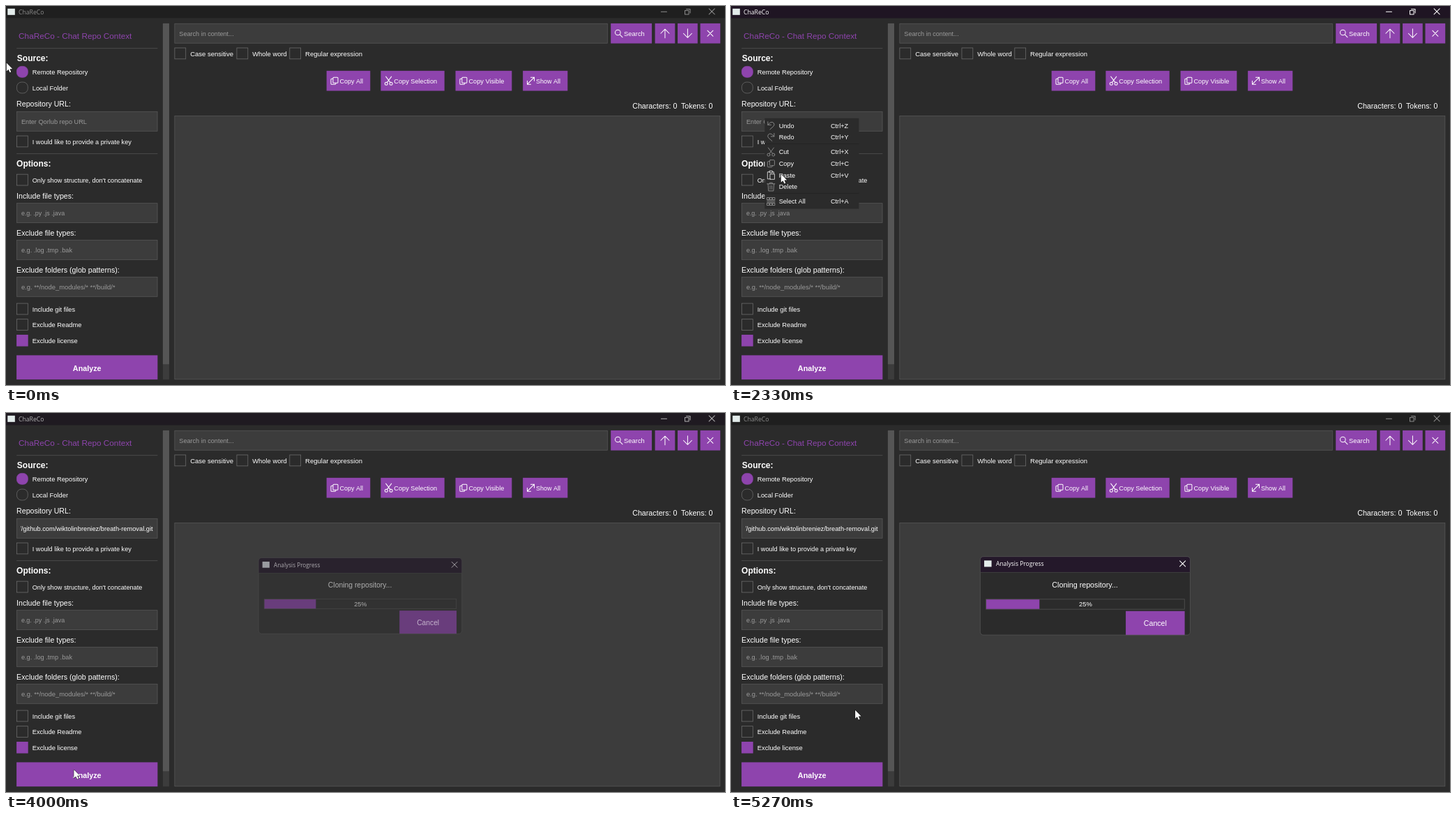
Animation of 1031 by 543 pixels, one loop 8 s. Source, as an HTML page with a canvas:

```html
<!DOCTYPE html>
<html lang="en">
<head>
<meta charset="utf-8">
<title>ChaReCo</title>
<style>
html, body { margin: 0; width: 100%; height: 100%; overflow: hidden; background: #2b2b2b; }
canvas { display: block; }
</style>
</head>
<body>
<canvas id="stage" width="1031" height="543"></canvas>
<script>
const ctx = document.getElementById('stage').getContext('2d');
// All coordinates belong to a 1366 pixel wide desktop, shown reduced
const SCALE = 1031 / 1366;
const LOOP = 8000, STEP = 200 / 3;
const PURPLE = '#8e44ad', BG = '#2b2b2b', FIELD = '#3c3c3c', LINE = '#555', HINT = '#9a9a9a';
const SANS = '"Liberation Sans", Arial, sans-serif', UI = '"Open Sans", "Noto Sans", sans-serif';
const FIELD_TOPS = [200, 374, 444, 514], FIELD_HEIGHT = 38;

const clamp = v => Math.max(0, Math.min(1, v));
const ramp = (t, from, to) => clamp((t - from) / (to - from));
const linear = k => k;
const easeOut = k => 1 - (1 - k) ** 2;
const easeInOut = k => k * k * (3 - 2 * k);

// Pointer stops: time, x, y, easing of the way there
const STOPS = [
  [0, 1, 108, linear],
  [400, 50, 227, easeInOut],
  [533, 58, 216, easeOut],
  [733, 58, 216, linear],
  [1000, 64, 212, easeOut],
  [1200, 64, 212, linear],
  [1333, 64, 213, linear],
  [1533, 64, 213, linear],
  [2333, 95, 319, easeInOut],
  [3000, 95, 319, linear],
  [3333, 122, 525, linear],
  [3867, 129, 677, easeOut],
  [4467, 129, 677, linear],
  [5267, 236, 564, easeInOut],
  [LOOP, 236, 564, linear]
];

function pointerAt(t) {
  const i = STOPS.findIndex((s, n) => n && t <= s[0]);
  const [t0, x0, y0] = STOPS[i - 1], [t1, x1, y1, ease] = STOPS[i];
  const k = ease(ramp(t, t0, t1));
  return [x0 + (x1 - x0) * k, y0 + (y1 - y0) * k];
}

function fill(x, y, w, h, color) {
  ctx.fillStyle = color;
  ctx.fillRect(x, y, w, h);
}

function frame(x, y, w, h, color = LINE) {
  ctx.strokeStyle = color;
  ctx.lineWidth = 1;
  ctx.strokeRect(x + .5, y + .5, w - 1, h - 1);
}

// y is the middle of the capitals
function text(str, x, y, size = 12.3, color = '#fff', align = 'left', weight = '', family = SANS) {
  ctx.font = `${weight} ${size}px ${family}`;
  ctx.fillStyle = color;
  ctx.textAlign = align;
  ctx.fillText(str, x, y + size * .36);
}

function icon(path, x, y, color = '#fff', width = 1) {
  ctx.save();
  ctx.translate(x, y);
  ctx.scale(4 / 3, 4 / 3);
  ctx.strokeStyle = color;
  ctx.lineWidth = width;
  ctx.lineJoin = ctx.lineCap = 'round';
  ctx.stroke(new Path2D(path));
  ctx.restore();
}

// Icons are centred on 0,0
const ICONS = {
  search: 'M2.6 -1.2a3.8 3.8 0 1 1 -7.6 0a3.8 3.8 0 1 1 7.6 0M1.6 1.6L5.5 5.5',
  up: 'M0 6.5V-6M-6 0L0 -6L6 0',
  down: 'M0 -6.5V6M-6 0L0 6L6 0',
  cross: 'M-4 -4L4 4M-4 4L4 -4',
  copy: 'M-1 -5H4Q5 -5 5 -4V2Q5 3 4 3H-1Q-2 3 -2 2V-4Q-2 -5 -1 -5M-2 -3H-4Q-5 -3 -5 -2V4Q-5 5 -4 5H1Q2 5 2 3',
  cut: 'M-4 -6L2.2 2.2M4 -6L-2.2 2.2M-1.4 4a2 2 0 1 1 -4 0a2 2 0 1 1 4 0M5.4 4a2 2 0 1 1 -4 0a2 2 0 1 1 4 0',
  expand: 'M-5 5L5 -5M0 -5H5V0M-5 0V5H0',
  undo: 'M-4.5 -5.5V-1H0M-4.5 -1L-1 -4.3Q2 -6 4 -3.5Q5.5 -1 3.5 1L-1.5 5.5',
  redo: 'M4.5 -5.5V-1H0M4.5 -1L1 -4.3Q-2 -6 -4 -3.5Q-5.5 -1 -3.5 1L1.5 5.5',
  paste: 'M-2 -4.5H-5V5.5H-1M2 -4.5H4V-2M-2 -6H2V-3.5H-2ZM-1 -1.5H5V6H-1Z',
  bin: 'M-5.5 -4H5.5M-2 -4V-5.5H2V-4M-4.3 -4L-3.5 6H3.5L4.3 -4M-1.3 -1.5V3.5M1.3 -1.5V3.5',
  all: 'M-5.5 -5.5h3v3h-3zM-1.5 -5.5h3v3h-3zM2.5 -5.5h3v3h-3zM-5.5 -1h11M-5.5 1h11M-5.5 2.5h3v3h-3zM-1.5 2.5h3v3h-3zM2.5 2.5h3v3h-3z',
  minimise: 'M-4 0H4',
  restore: 'M-3.5 -1.5H2V4H-3.5ZM-1.5 -3.5H4V2',
  beam: 'M0 -5.5V5.5M-2.5 -6H-1L0 -5.5L1 -6H2.5M-2.5 6H-1L0 5.5L1 6H2.5'
};

function checkBox(x, y, label, size, on) {
  if (on) fill(x, y - 11, 22, 22, PURPLE);
  else frame(x, y - 11, 22, 22, '#6e6e6e');
  text(label, x + 30, y + .5, size);
}

function radio(y, label, on) {
  ctx.beginPath();
  ctx.roundRect(20.5, y - 10.5, 21, 21, 9);
  ctx.fillStyle = on ? PURPLE : BG;
  ctx.strokeStyle = on ? PURPLE : '#6e6e6e';
  ctx.lineWidth = 1;
  ctx.fill();
  ctx.stroke();
  text(label, 50, y + .5, 12.35);
}

function field(x, y, w, h, hint, size) {
  fill(x, y, w, h, FIELD);
  frame(x, y, w, h);
  if (hint) text(hint, x + 9, y + 19.5, size, HINT);
}

function button(x, y, w, name, label, size) {
  fill(x, y, w, 38, PURPLE);
  if (!label) return icon(ICONS[name], x + w / 2, y + 19);
  icon(ICONS[name], x + 15, y + 19);
  text(label, x + 25, y + 19.5, size);
}

function titleBar(active) {
  const paint = (color, alpha) => {
    ctx.globalAlpha = alpha;
    text('ChaReCo', 24, 11.5, 11.4, color, 'left', '', UI);
    icon(ICONS.minimise, 1250, 11, color);
    icon(ICONS.restore, 1294.5, 10.5, color);
    icon(ICONS.cross, 1341, 10.5, color);
  };
  fill(0, 0, 1366, 23, '#1f1f1f');
  ctx.globalAlpha = active;
  fill(0, 0, 1366, 23, '#1f1523');
  paint('#8c8c8c', 1 - active);
  paint('#fff', active);
  ctx.globalAlpha = 1;
  fill(3, 5, 14, 12, '#e3eceb');
}

function sidebar(pasted) {
  const [url, include, exclude, folders] = FIELD_TOPS;
  const input = (top, hint, size) => field(20, top, 268, FIELD_HEIGHT, hint, size);

  text('ChaReCo - Chat Repo Context', 24, 56.3, 15.6, PURPLE);
  fill(20, 80, 268, 1, LINE);
  text('Source:', 21, 99.5, 15.9, '#fff', 'left', 'bold');
  radio(125, 'Remote Repository', true);
  radio(155, 'Local Folder', false);
  text('Repository URL:', 20, 186, 14.05);
  input(url, pasted ? '' : 'Enter Qorlub repo URL', 12.2);
  if (pasted) {
    ctx.save();
    ctx.beginPath();
    ctx.rect(28, 201, 258, 36);
    ctx.clip();
    text('https://github.com/wiktolinbreniez/breath-removal.git', 279, 220, 12.3, '#fff', 'right');
    ctx.restore();
  }
  checkBox(20, 257, 'I would like to provide a private key', 12.1);
  fill(20, 280, 268, 1, LINE);
  text('Options:', 20, 299.5, 15.9, '#fff', 'left', 'bold');
  checkBox(20, 330, "Only show structure, don't concatenate", 12.1);
  text('Include file types:', 20, 361, 14.05);
  input(include, 'e.g. .py .js .java', 11.9);
  text('Exclude file types:', 20, 431, 14.05);
  input(exclude, 'e.g. .log .tmp .bak', 12.2);
  text('Exclude folders (glob patterns):', 20, 501, 14.15);
  input(folders, 'e.g. **/node_modules/* **/build/*', 12.45);
  checkBox(20, 575, 'Include git files', 12.3);
  checkBox(20, 605, 'Exclude Readme', 12.3);
  checkBox(20, 635, 'Exclude license', 12.4, true);
  fill(20, 663, 268, 46, PURPLE);
  text('Analyze', 154, 688, 14.3, '#fff', 'center', 'bold');
  fill(298, 33, 12, 676, FIELD);
  fill(298, 33, 12, 647, LINE);
}

function content() {
  field(320, 33, 823, FIELD_HEIGHT, 'Search in content...', 12.05);
  button(1149, 33, 78, 'search', 'Search', 12.45);
  button(1233, 33, 38, 'up');
  button(1276, 33, 38, 'down');
  button(1319, 33, 38, 'cross');
  checkBox(320, 90, 'Case sensitive', 12.6);
  checkBox(438, 90, 'Whole word', 12.45);
  checkBox(538.5, 90, 'Regular expression', 12.6);
  button(609, 123, 83, 'copy', 'Copy All', 11.9);
  button(712, 123, 121, 'cut', 'Copy Selection', 12.2);
  button(854, 123, 107, 'copy', 'Copy Visible', 12.2);
  button(982, 123, 85, 'expand', 'Show All', 11.9);
  text('Characters: 0', 1190, 190, 14.2);
  text('Tokens: 0', 1282.5, 190, 14.05);
  field(320, 208, 1037, 501);
}

const MENU = [
  [227, 'undo', 'Undo', 'Z'], [249, 'redo', 'Redo', 'Y'], [277, 'cut', 'Cut', 'X'],
  [299, 'copy', 'Copy', 'C'], [321, 'paste', 'Paste', 'V'], [343, 'bin', 'Delete'],
  [371, 'all', 'Select All', 'A']
];

function contextMenu() {
  fill(64, 213, 179, 172, BG);
  fill(64, 261, 179, 1, '#222');
  fill(64, 355, 179, 1, '#222');
  for (const [y, name, label, key] of MENU) {
    icon(ICONS[name], 76, y, name === 'paste' ? '#eee' : '#999', .8);
    text(label, 91, y, 12.1);
    if (key) text('Ctrl+' + key, 189.5, y, 12.05);
  }
}

function dialog(shown) {
  const zoom = .92 + .08 * shown;
  ctx.save();
  ctx.globalAlpha = shown;
  ctx.translate(673, 347);
  ctx.scale(zoom, zoom);
  ctx.translate(-673, -347);
  ctx.beginPath();
  ctx.roundRect(473.5, 272.5, 399, 149, 6);
  ctx.save();
  ctx.clip();
  fill(473, 272, 400, 150, BG);
  fill(473, 272, 400, 30, '#24182a');
  fill(750, 376, 112, 46, PURPLE);
  ctx.restore();
  ctx.strokeStyle = LINE;
  ctx.lineWidth = 1;
  ctx.stroke();
  fill(473, 302, 400, 1, '#444');
  fill(481, 280, 14, 12, '#e3eceb');
  text('Analysis Progress', 503.5, 286.5, 11.25, '#fff', 'left', '', UI);
  icon(ICONS.cross, 858, 286);
  text('Cloning repository...', 672.5, 326, 14.2, '#fff', 'center');
  frame(484, 353, 378, 20);
  fill(485, 354, 101, 18, PURPLE);
  text('25%', 673.5, 362.5, 12.45, '#fff', 'center');
  text('Cancel', 806, 399, 14.05, '#fff', 'center');
  ctx.restore();
}

function pointer(x, y, beam) {
  if (beam) return icon(ICONS.beam, x, y, '#c8c8c8', .9);
  ctx.save();
  ctx.translate(x, y);
  const arrow = new Path2D('M0 0V16L3.7 12.6L6.2 18.3L8.7 17.2L6.4 11.7H11.4Z');
  ctx.strokeStyle = '#000';
  ctx.lineWidth = 1.3;
  ctx.stroke(arrow);
  ctx.fillStyle = '#fff';
  ctx.fill(arrow);
  ctx.restore();
}

function draw(now) {
  // The screen is refreshed fifteen times a second
  const t = Math.floor((now % LOOP + 4) / STEP) * STEP + .5;
  const menu = t > 1530 && t < 2866;
  const pasted = t > 2866;
  const [x, y] = pointerAt(Math.min(t, LOOP));

  ctx.setTransform(SCALE, 0, 0, SCALE, 0, 0);
  fill(0, 0, 1366, 720, BG);
  titleBar(ramp(t, 733, 1000) - ramp(t, 3867, 4133));
  sidebar(pasted);
  content();
  if (t > 866 && t < 1530) fill(29, 212, 1, 16, '#fff');
  if (pasted && t < 3399) fill(279, 212, 1, 16, '#fff');
  if (menu) contextMenu();
  if (t > 3930) dialog(ramp(t, 3800, 4133));
  pointer(x, y, !menu && FIELD_TOPS.some(top => y > top && y < top + FIELD_HEIGHT));
}

function tick() {
  draw(performance.now());
  requestAnimationFrame(tick);
}
tick();
</script>
</body>
</html>
```
